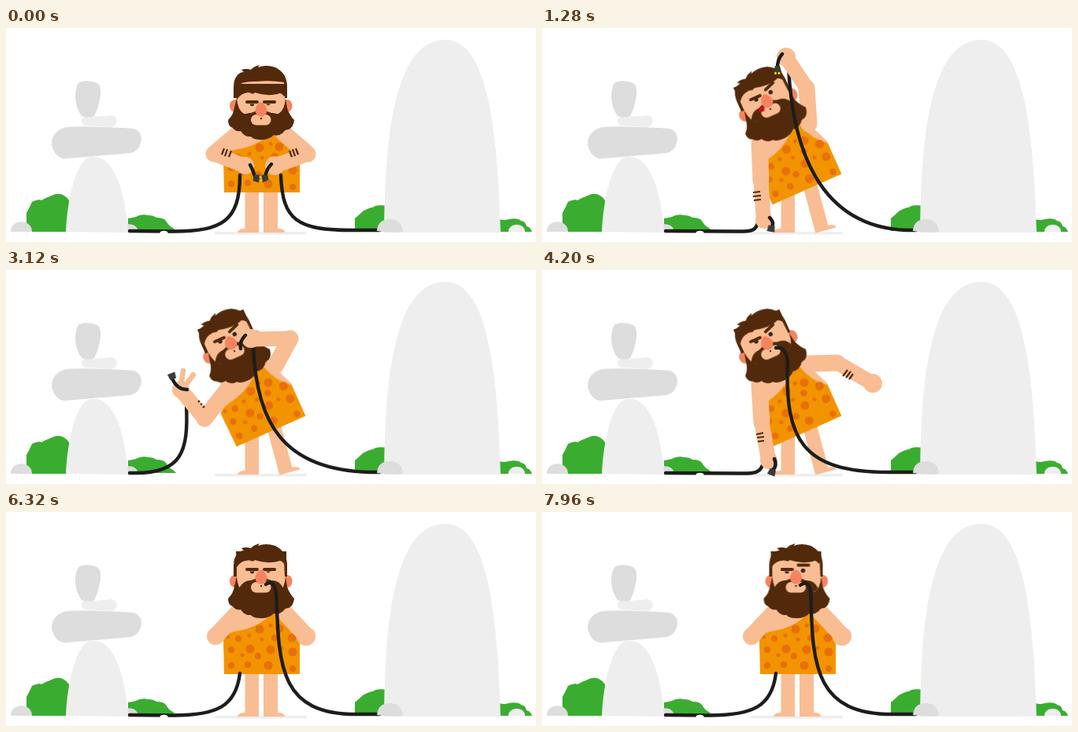
Recreate the animation shown at these times as an HTML page without scripts. Size 673 px wide and 272 px high, loop 8 s.

```html
<!DOCTYPE html>
<html lang="en">
<head>
<meta charset="utf-8">
<title>Caveman and the cable</title>
<style>
  html, body { margin: 0; width: 100%; height: 100%; overflow: hidden; background: #fff; }
  svg { display: block; width: 100%; height: 100%; }

  .pale { fill: #eee; }
  .grey { fill: #ddd; }
  .bush { fill: #3aad30; }
  .skin { fill: #f8bd93; }
  .hair { fill: #52290b; }
  .blush { fill: #f5835f; }
  .limb { fill: none; stroke: #f8bd93; stroke-width: 19; stroke-linecap: round; stroke-linejoin: round; }
  .upper { stroke-width: 21; }
  .wire { fill: none; stroke: #1d1d1b; stroke-width: 4.4; stroke-linecap: round; stroke-linejoin: round; }
  .band { fill: none; stroke: #52290b; stroke-width: 2.2; }
  .brow { fill: none; stroke: #52290b; stroke-width: 4; stroke-linecap: round; }
  .dots { fill: none; stroke: #e86f0a; stroke-linecap: round; }

  .move { animation: 8s ease-in-out infinite; }
  .body { transform-origin: 325px 206px; animation-name: body; }
  .head { animation-name: head; }
  .face { animation-name: face; }
  .ears { animation-name: ears; }
  .leg { transform-origin: 336px 206px; animation-name: leg; }
  .brow-r { transform-origin: 334px 73px; animation-name: brow; }
  .lid-l { animation-name: lidL; animation-timing-function: step-end; }
  .lid-r { animation-name: lidR; animation-timing-function: step-end; }
  .tongue { animation-name: tongue; animation-timing-function: step-end; }

  /* Whole torso leans over, then straightens up */
  @keyframes body {
    0%, 3% { transform: translate(0, 3px) rotate(0deg); }
    10.5%, 71.5% { transform: translate(11.5px, -1px) rotate(-24deg); }
    77.5%, 100% { transform: translate(0, 0) rotate(0deg); }
  }
  @keyframes head {
    0%, 3% { transform: translate(0, 4px); }
    10.5%, 86% { transform: translate(0, 0); }
    91%, 100% { transform: translate(-.5px, 0); }
  }
  @keyframes face {
    0%, 3% { transform: translate(0, 14px); }
    10.5%, 86% { transform: translate(0, 0); }
    91%, 100% { transform: translate(-1px, 0); }
  }
  @keyframes ears { 0%, 3% { transform: translate(0, 4px); } 10.5%, 100% { transform: none; } }
  @keyframes leg {
    0%, 3% { transform: rotate(0deg); }
    10.5%, 71.5% { transform: translate(6px, 0) rotate(-15deg); }
    77.5%, 100% { transform: rotate(0deg); }
  }
  @keyframes brow {
    0%, 3% { transform: rotate(0deg); }
    10.5%, 71.5% { transform: translate(0, -6px) rotate(-20deg); }
    77.5%, 88% { transform: rotate(0deg); }
    91%, 100% { transform: translate(-1px, -5.5px) rotate(0deg); }
  }
  @keyframes lidL { 0% { opacity: 1; } 7% { opacity: 0; } 74.5%, 100% { opacity: 1; } }
  @keyframes lidR { 0% { opacity: 1; } 7% { opacity: 0; } 74.5% { opacity: 1; } 89.5%, 100% { opacity: 0; } }
  @keyframes tongue { 0% { opacity: 0; } 9% { opacity: 1; } 22%, 100% { opacity: 0; } }

  /* Left arm: front, ground, raised, ground, behind the back */
  .upper-l { animation-name: upperL; }
  .fore-l { animation-name: foreL; }
  .hand-l { animation-name: handL; }
  .fingers { animation-name: fingers; }
  .band-l { animation-name: bandL; }
  @keyframes upperL {
    0%, 3% { d: path("M296 133L264 160"); }
    10.5%, 29% { d: path("M276 146L278 194"); }
    34.5%, 42.5% { d: path("M281 152L252 189"); }
    47.5%, 71.5% { d: path("M276 146L279 194"); }
    77.5%, 100% { d: path("M296 126L266 158"); }
  }
  @keyframes foreL {
    0%, 3% { d: path("M264 160L303 175"); }
    10.5%, 29% { d: path("M278 194L281 238"); }
    34.5%, 42.5% { d: path("M252 189L224 155"); }
    47.5%, 53% { d: path("M279 194L287 238"); }
    58%, 71.5% { d: path("M278 194L281 238"); }
    77.5%, 100% { d: path("M266 158L266 158"); }
  }
  @keyframes handL {
    0%, 3% { transform: translate(304px, 175px); }
    10.5%, 29% { transform: translate(282px, 244px); }
    34.5%, 42.5% { transform: translate(222px, 152px); }
    47.5%, 53% { transform: translate(288px, 242px); }
    58%, 71.5% { transform: translate(281px, 244px); }
    77.5%, 100% { transform: translate(266px, 158px); }
  }
  @keyframes fingers {
    0%, 29% { transform: scale(0); }
    34.5%, 42.5% { transform: scale(1); }
    47.5%, 100% { transform: scale(0); }
  }
  @keyframes bandL {
    0%, 3% { d: path("M277 153L274 161M281 154L278 163M286 156L283 164"); opacity: 1; }
    10.5%, 29% { d: path("M268 209L277 208M268 214L278 213M269 219L278 218"); opacity: 1; }
    34.5%, 42.5% { d: path("M244 168L246 166M247 171L249 170M250 175L252 173"); opacity: 1; }
    47.5%, 53% { d: path("M272 209L281 207M273 213L282 212M274 218L282 217"); opacity: 1; }
    58%, 71.5% { d: path("M267 209L276 208M268 214L277 213M268 219L277 218"); opacity: 1; }
    74%, 100% { d: path("M266 166L266 166M266 166L266 166M266 166L266 166"); opacity: 0; }
  }

  /* Right arm: front, overhead, mouth, flung out, behind the back */
  .upper-r { animation-name: upperR; }
  .fore-r { animation-name: foreR; }
  .hand-r { animation-name: handR; }
  .band-r { animation-name: bandR; }
  @keyframes upperR {
    0%, 3% { d: path("M352 133L383 160"); }
    10.5%, 19% { d: path("M339 122L336 76"); }
    24%, 42.5% { d: path("M342 122L361 87"); }
    46% { d: path("M340 120L366 88"); }
    50%, 53% { d: path("M338 119L375 118"); }
    58%, 71.5% { d: path("M337 119L370 140"); }
    77.5%, 100% { d: path("M352 126L382 158"); }
  }
  @keyframes foreR {
    0%, 3% { d: path("M383 160L342 175"); }
    10.5%, 19% { d: path("M336 76L311 39"); }
    24%, 42.5% { d: path("M361 87L312 88"); }
    46% { d: path("M366 88L384 45"); }
    50%, 53% { d: path("M375 118L418 143"); }
    58%, 71.5% { d: path("M370 140L370 140"); }
    77.5%, 100% { d: path("M382 158L382 158"); }
  }
  @keyframes handR {
    0%, 3% { transform: translate(341px, 175px); }
    10.5%, 19% { transform: translate(310px, 37px); }
    24%, 42.5% { transform: translate(311px, 87px); }
    46% { transform: translate(385px, 42px); }
    50%, 53% { transform: translate(420px, 144px); }
    58%, 71.5% { transform: translate(369px, 140px); }
    77.5%, 100% { transform: translate(381px, 158px); }
  }
  @keyframes bandR {
    0%, 3% { d: path("M360 156L363 164M364 154L367 163M368 153L371 161"); opacity: 1; }
    7%, 43% { d: path("M360 156L363 164M364 154L367 163M368 153L371 161"); opacity: 0; }
    46% { d: path("M372 62L380 66M374 58L382 62M376 54L384 58"); opacity: 0; }
    50%, 53% { d: path("M388 127L382 135M392 129L386 137M395 132L390 139"); opacity: 1; }
    56%, 100% { d: path("M380 138L378 142M382 139L380 143M384 140L382 144"); opacity: 0; }
  }

  /* Cables: long run, short end in the hand, plug */
  .run-l { animation-name: runL; }
  .end-l { animation-name: endL; }
  .plug-l { animation-name: plugL; }
  .run-r { animation-name: runR; }
  .end-r { animation-name: endR; }
  .plug-r { animation-name: plugR; }
  @keyframes runL {
    0%, 3% { d: path("M157 258L210 258.5C275 259 297 245 297 187"); }
    10.5%, 29% { d: path("M157 258L245 258.5C266 259 271 258 274 248"); }
    34.5%, 42.5% { d: path("M157 258L165 258C222 258 232 232 229 172"); }
    47.5%, 53% { d: path("M157 258L250 258.5C271 259 277 257 280 248"); }
    58%, 71.5% { d: path("M157 258L245 258.5C266 259 270 258 272 248"); }
    77.5%, 100% { d: path("M157 258L210 258.5C268 259 292 247 297 205"); }
  }
  @keyframes endL {
    0%, 3% { d: path("M310 174Q314 181 316 189"); opacity: 1; }
    10.5%, 29% { d: path("M289 241Q296 248 291 254"); opacity: 1; }
    34.5%, 42.5% { d: path("M230 152Q217 152 211 138"); opacity: 1; }
    47.5%, 53% { d: path("M295 240Q299 249 293 254"); opacity: 1; }
    58%, 71.5% { d: path("M288 242Q294 251 287 255"); opacity: 1; }
    74%, 100% { d: path("M280 190Q284 196 280 200"); opacity: 0; }
  }
  @keyframes plugL {
    0%, 3% { transform: translate(318px, 191px) rotate(-80deg); opacity: 1; }
    10.5%, 29% { transform: translate(291px, 255px) rotate(10deg); opacity: 1; }
    34.5%, 42.5% { transform: translate(211px, 135px) rotate(160deg); opacity: 1; }
    47.5%, 53% { transform: translate(292px, 257px) rotate(20deg); opacity: 1; }
    58%, 71.5% { transform: translate(286px, 257px) rotate(30deg); opacity: 1; }
    74%, 100% { transform: translate(280px, 200px) rotate(30deg); opacity: 0; }
  }
  @keyframes runR {
    0%, 3% { d: path("M475 257L440 257C370 257 351 245 349 187"); }
    10.5%, 19% { d: path("M475 257L462 257C350 252 318 150 313 50"); }
    24%, 42.5% { d: path("M475 257L462 257C350 254 318 192 314 98"); }
    47.5%, 71.5% { d: path("M475 257L440 257C330 257 308 215 312 116"); }
    77.5%, 86% { d: path("M475 257L445 257C350 257 346 200 343.5 108"); }
    91%, 100% { d: path("M475 257L445 257C350 257 343 200 341.5 108"); }
  }
  @keyframes endR {
    0%, 3% { d: path("M337 173Q331 179 329 189"); }
    10.5%, 19% { d: path("M305 33Q299 40 299 50"); }
    24%, 42.5% { d: path("M304 83Q296 91 298 100"); }
    47.5%, 71.5% { d: path("M312 117Q310 97 297 99"); }
    77.5%, 86% { d: path("M343.5 109Q342 84 330 92"); }
    91%, 100% { d: path("M341.5 109Q341 84 328 93"); }
  }
  @keyframes plugR {
    0%, 3% { transform: translate(328px, 191px) rotate(80deg); opacity: 1; }
    10.5%, 19% { transform: translate(299px, 53px) rotate(0deg); opacity: 1; }
    23% { transform: translate(297px, 98px) rotate(10deg); opacity: 1; }
    24%, 100% { transform: translate(297px, 100px) rotate(10deg); opacity: 0; }
  }
</style>
</head>
<body>
<svg viewBox="0 0 673 272">
  <!-- Scenery -->
  <g class="bush">
    <path d="M26 259V235Q30 228 33 221Q42 217 45 219Q52 215 56 214Q63 210 69 211Q76 213 80 219L84 259Z"/>
    <path d="M155 258V242Q162 241 165 240Q172 236 180 238Q187 238 191 241Q200 241 203 245Q207 252 212 254L216 258Z"/>
    <path d="M443 258V242Q450 236 453 233Q462 228 466 228Q470 224 484 226V258Z"/>
    <path d="M626 243Q634 245 638 243Q650 241 654 245Q660 246 661 252Q666 253 668 259H626Z"/>
  </g>
  <g class="grey">
    <path d="M93 69Q104 65 116 70Q121 74 120 86Q117 103 112 112Q104 116 96 112Q88 100 88 88Q88 74 93 69Z"/>
    <path d="M6 259C6 242 33 242 33 259Z"/>
    <path d="M150 259V250Q165 247 168 258Z"/>
  </g>
  <path class="pale" d="M98 114L134 111Q140 112 141 118Q140 125 133 126L100 124Q93 119 98 114Z"/>
  <path class="pale" d="M76 259C78 215 90 165 108 164C142 159 153 225 155 260Z"/>
  <path class="grey" d="M76 126Q100 124 163 128Q172 132 172 142Q170 156 158 159L76 166Q62 166 58 148Q58 131 76 126Z"/>
  <path class="pale" d="M480 260C481 150 490 15 558 15C614 15 624 140 628 260Z"/>
  <path class="pale" d="M638 259C638 247 659 247 659 259Z"/>
  <rect class="pale" x="265" y="259" width="117" height="3.5" rx="1.7"/>

  <!-- Legs -->
  <path class="skin" d="M303.500 200H321V260H294Q295 255 303.500 255Z"/>
  <path class="skin move leg" d="M327 196H345V255Q354 255 354 260H327Z"/>

  <!-- Torso -->
  <g class="move body">
    <path class="skin" d="M296 114L276 158V175H373V160L354 114Z"/>
    <path fill="#f29400" d="M277 206L276 160Q280 154 290 152Q322 147 338 128H350Q356 150 373 163V206Z"/>
    <path class="dots" stroke-width="11" d="M347 148h0M363 160h0M364 178h0M333 195h0M310 174h0M336 175h0M322 149h0"/>
    <path class="dots" stroke-width="8.500" d="M295 161h0M341 160h0M286 175h0M320 183h0M286 195h0M307 194h0M364 199h0"/>
    <path class="dots" stroke-width="5" d="M336 144h0M309 157h0M325 162h0M282 159h0M350 173h0M300 182h0"/>
  </g>

  <path class="wire move run-l" d="M157 258"/>
  <ellipse cx="200.500" cy="260.500" rx="5" ry="2.800" fill="#fff"/>
  <path class="limb upper move upper-l"/>
  <path class="limb upper move upper-r"/>
  <path class="limb move fore-l"/>
  <path class="band move band-l"/>
  <g class="move hand-l">
    <circle class="skin" r="11"/>
    <path class="limb move fingers" style="stroke-width:6.500" d="M0 -4L3 -24M4 -3L16 -19"/>
  </g>

  <!-- Head -->
  <g class="move body">
    <g class="move head">
      <g class="blush move ears">
        <ellipse cx="291" cy="88" rx="7" ry="8"/>
        <ellipse cx="357" cy="88" rx="6.500" ry="8"/>
      </g>
      <rect class="skin" x="293" y="52" width="62" height="55"/>
      <path class="hair" d="M293 82Q294 97 302 102H346Q354 97 355 82L357 95Q360 104 366 110Q365 119 359 122Q354 122 352 126Q346 131 340 129Q334 135 324 135Q314 135 311 131Q303 132 298 124Q291 125 288 120Q282 118 282 110Q289 103 290 94Z"/>
      <g class="move face">
        <path class="hair" d="M296 97Q302 86 311 87Q324 80 337 87Q347 86 352 97Q346 106 324 107Q302 106 296 97Z"/>
        <rect class="skin" x="311" y="89" width="25.500" height="13.500" rx="6.500"/>
        <circle cx="324" cy="94" r="1.200" fill="#52290b"/>
        <ellipse class="move tongue" cx="313.500" cy="90" rx="4" ry="3" fill="#e30613"/>
        <path class="hair" d="M292 50H356V62L353 66Q349 60 345 63Q330 66 316 61Q314 64 309 61Q299 61 293 70Z"/>
        <g fill="#2b2623">
          <circle cx="312.500" cy="75.500" r="2.700"/>
          <circle cx="333" cy="74.500" r="2.700"/>
        </g>
        <rect class="skin move lid-l" x="306" y="70" width="13" height="5.500"/>
        <rect class="skin move lid-r" x="327" y="70" width="13" height="5.500"/>
        <path class="brow" d="M306 73H319"/>
        <path class="brow move brow-r" d="M328 73H341"/>
        <path class="blush" d="M321 75Q324 72 327 75Q332 80 331.500 84A7.500 7.500 0 0 1 316.500 84Q316 80 321 75Z"/>
      </g>
      <path class="hair" d="M289 82V68Q289 58 294 53Q297 49 302 49L299 46Q305 44 311 46Q314 42 322 40L320 43Q330 39 342 43Q356 50 357 66V82H354L353 62Q335 59 318 61Q300 60 293 67V82Z"/>
    </g>
  </g>

  <!-- Right cable and forearm pass in front of the face -->
  <path class="wire move run-r"/>
  <path class="grey" d="M471 258Q472 243 488 243Q503 244 504 259Q488 261 471 258Z"/>
  <path class="limb move fore-r"/>
  <path class="band move band-r"/>
  <circle class="skin move hand-r" r="12"/>

  <path class="wire move end-l"/>
  <path class="wire move end-r"/>
  <path class="move plug-l" fill="#3a3a38" d="M-4 -4H4L5 4H-5Z"/>
  <g class="move plug-r">
    <path d="M-2.500 3V6M2 3V6" stroke="#ffd500" stroke-width="2.500"/>
    <path fill="#3a3a38" d="M-3 -5H3L5 3H-5Z"/>
  </g>
</svg>
</body>
</html>
```
